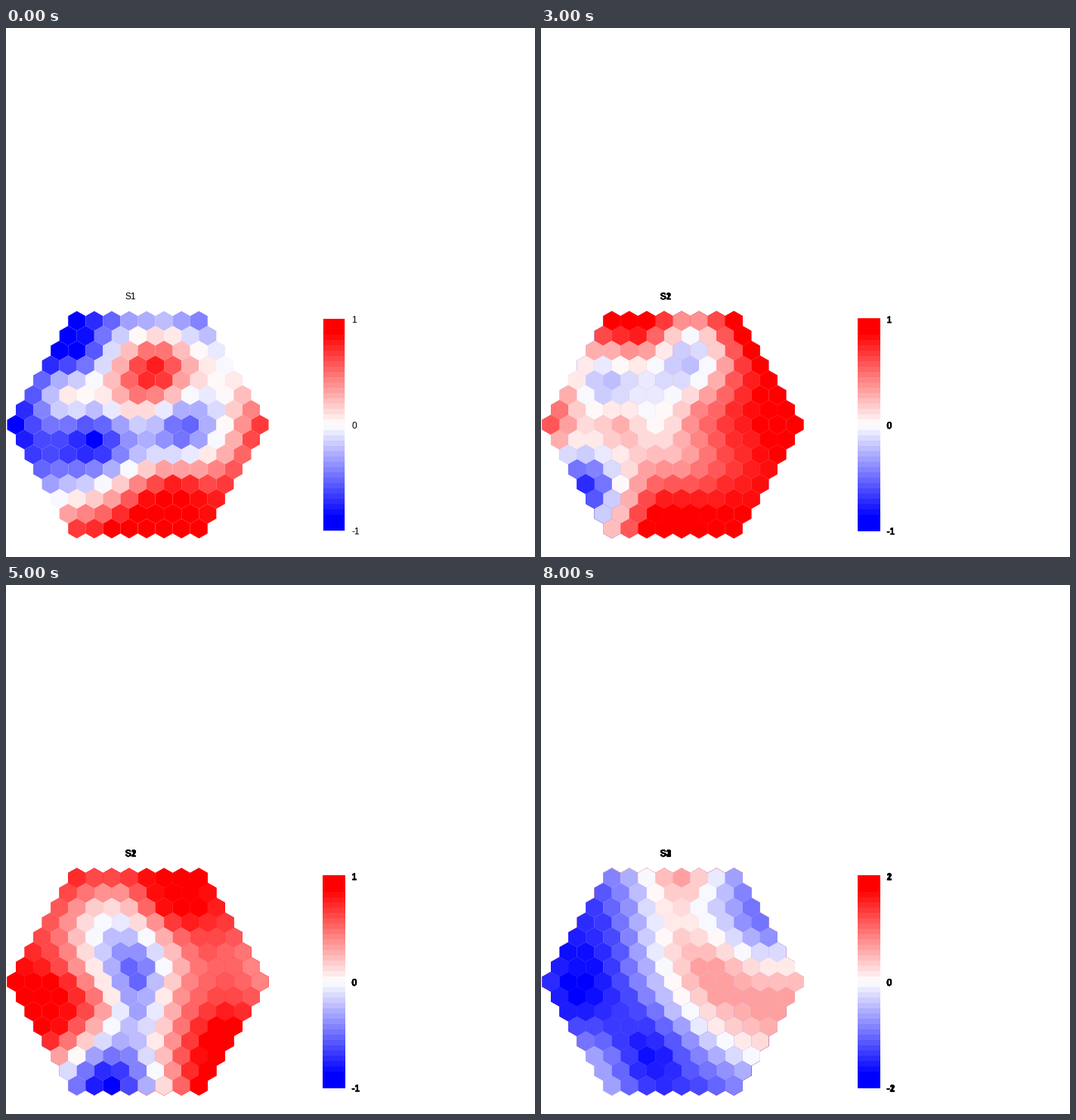
A matplotlib script that plays this animation: 700 by 700 pixels, repeating every 9 s.

```python
import numpy as np
import matplotlib.pyplot as plt
from matplotlib.animation import FuncAnimation
from matplotlib.collections import PolyCollection
from matplotlib.patheffects import withStroke

SIZE, DPI = 700, 100
ROWS, MID, LEVELS = 15, 7, 40
CX, CY, CELL_W, R = 174.5, 525.0, 23.07, 13.08
BAR_L, BAR_R, BAR_T, STEP = 420, 448, 385, 7
GAIN = 1.12  # the ramp saturates a little before its ends


def row_cells(row):
    n = ROWS - abs(row - MID)
    x = CX + (np.arange(n) - (n - 1) / 2) * CELL_W
    return np.column_stack([x, np.full(n, CY + (row - MID) * 1.5 * R)])


CELLS = np.vstack([row_cells(r) for r in range(ROWS)])
# Clockwise from the top left.
CORNERS = np.array([row_cells(r)[side] for r, side in
                    [(0, 0), (0, -1), (MID, -1), (-1 + ROWS, -1), (-1 + ROWS, 0), (MID, 0)]])


def kernel(a, b):
    d2 = ((a[:, None] - b[None]) ** 2).sum(-1) / 1e4
    return d2 * np.log(d2 + 1e-12)


def affine(p):
    return np.column_stack([np.ones(len(p)), p / 100])


def field(corners, *points):
    """Smooth surface through the corner values and a few (x, y, value) points."""
    points = np.array(points)
    knots = np.vstack([CORNERS, points[:, :2]])
    values = np.concatenate([corners, points[:, 2], np.zeros(3)])
    P = affine(knots)
    A = np.block([[kernel(knots, knots), P], [P.T, np.zeros((3, 3))]])
    w = np.linalg.solve(A, values)
    return kernel(CELLS, knots) @ w[:-3] + affine(CELLS) @ w[-3:]


s1_a = field((-1, -.5, .78, 1, .75, -1),
             (93, 427, -1.1), (186, 387, -.3), (197, 456, .95), (82, 486, .08),
             (290, 450, 0), (174, 505, .2), (116, 544, -1), (232, 530, -.7),
             (278, 544, -.05), (220, 613, 1.1), (105, 623, .12), (105, 584, -.5))

s1_b = field((-.25, 1, -.15, -.65, -1, .28),
             (70, 436, -.5), (186, 400, 1.15), (140, 466, .95), (105, 495, .6),
             (197, 486, 0), (290, 466, -1), (197, 535, -.28), (59, 544, .02),
             (266, 554, .25), (95, 613, -1.15), (186, 652, .95), (151, 603, -.15),
             (285, 613, -.95), (232, 594, 0))

s2_a = field((1.1, 1.1, 1.1, 1.1, .27, .65),
             (130, 397, 1.1), (197, 400, .1), (197, 446, -.28), (82, 466, -.28),
             (140, 476, -.08), (70, 505, .03), (105, 525, .3), (151, 525, .02),
             (200, 510, .42), (266, 500, .9), (68, 605, -.78), (105, 594, 0),
             (197, 575, .4), (151, 643, 1.05))

s2_c = field((.85, 1, .5, 1, -.55, 1),
             (220, 420, 1.1), (139, 427, .12), (151, 466, -.3), (174, 515, -.65),
             (116, 505, .08), (70, 535, 1), (128, 554, .4), (174, 564, -.35),
             (209, 535, .05), (255, 505, .55), (278, 594, 1.05), (197, 603, .05),
             (128, 650, -.95), (59, 600, .9))

s3_a = field((.2, -.4, -.3, -.7, .02, -.35),
             (139, 387, .4), (232, 387, -.5), (186, 427, .02), (59, 456, .6),
             (163, 466, .25), (105, 505, -.02), (278, 427, .12), (220, 486, -.1),
             (255, 554, -1), (59, 564, -.65), (151, 544, -.45), (174, 613, -.7),
             (116, 623, -.05), (301, 480, -.5))

s3_c = field((-.5, -.35, .28, -.5, -.35, -.85),
             (186, 387, .4), (139, 397, -.1), (290, 456, -.5), (209, 427, -.02),
             (93, 456, -.7), (40, 545, -1), (186, 466, .2), (220, 515, .4),
             (174, 525, .02), (313, 564, .38), (232, 584, .08), (232, 613, -.2),
             (140, 623, -.95), (70, 620, -.4))

# (title, scale limit, values)
STATES = [("S1", 1, s1_a), ("S1", 1, s1_b), ("S1", 1, (s1_b + s2_a) / 2),
          ("S2", 1, s2_a), ("S2", 1, (s2_a + s2_c) / 2), ("S2", 1, s2_c),
          ("S3", 2, s3_a), ("S3", 2, (s3_a + s3_c) / 2), ("S3", 2, s3_c)]


def ramp(v):
    """Blue through white to red."""
    v = np.clip(v, -1, 1)
    return np.column_stack([np.minimum(1 + v, 1), 1 - abs(v), np.minimum(1 - v, 1)])


BAND_VALUES = GAIN * np.linspace(1, -1, LEVELS)


def to_band(v):
    nearest = abs(v[:, None] - BAND_VALUES).argmin(1)
    return BAND_VALUES[nearest]


angles = np.radians(np.arange(30, 390, 60))
corner = np.column_stack([np.cos(angles) * CELL_W / np.sqrt(3), np.sin(angles) * R])
HEXES = CELLS[:, None] + corner

fig = plt.figure(figsize=(SIZE / DPI, SIZE / DPI), dpi=DPI, facecolor="white")
ax = fig.add_axes([0, 0, 1, 1])
ax.set(xlim=(0, SIZE), ylim=(SIZE, 0))
ax.axis("off")


def polys(verts, colors):
    shapes = PolyCollection(verts, facecolors=colors, edgecolors="none",
                            linewidths=0, antialiaseds=True)
    shapes.set_snap(False)
    return ax.add_collection(shapes, autolim=False)


def bar_bands(grow):
    y = BAR_T + STEP * np.arange(LEVELS + 1.0)
    y[0] -= grow
    y[-1] += grow
    l, r = BAR_L - grow, BAR_R + grow
    return [[(l, a), (r, a), (r, b), (l, b)] for a, b in zip(y[:-1], y[1:])]


def label(x, y, text, bold, ha="left"):
    effects = [withStroke(linewidth=0.35, foreground="black")] if bold else None
    return ax.text(x, y, text, ha=ha, va="baseline", family="Liberation Sans",
                   fontsize=12 * 72 / DPI, color="black", path_effects=effects)


def layer(i, title, limit, values):
    over = i > 0  # layers after the first have harder edges
    return [polys(HEXES, ramp(to_band(values))),
            polys(bar_bands(0.7 if over else 0.15), ramp(BAND_VALUES)),
            label(165, 359, title, over, "center"),
            label(457.5, 390, f"{limit}", over),
            label(457.5, 530, "0", over),
            label(457.5, 670, f"-{limit}", over)]


layers = [layer(i, *state) for i, state in enumerate(STATES)]


def update(k):
    # Layers pile up without clearing, so soft edges and labels darken.
    for i, artists in enumerate(layers):
        for artist in artists:
            artist.set_visible(i <= k)
    return []


anim = FuncAnimation(fig, update, frames=len(STATES), interval=1000,
                     repeat=True, repeat_delay=0, blit=False)
plt.show()
```
